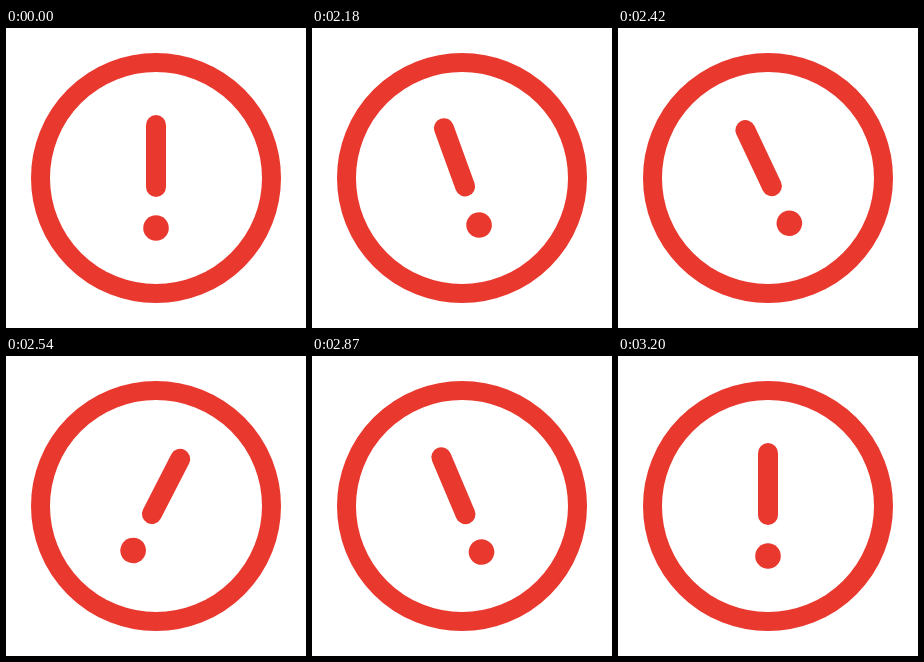
Write an HTML page that moves like this. It is 300 px wide and 300 px high and loops after 3.23 s.

```html
<!DOCTYPE html>
<html lang="en">
<head>
<meta charset="utf-8">
<title>Warning icon</title>
<style>
  html, body { margin: 0; width: 100%; height: 100%; overflow: hidden; background: #fff; }
  svg { display: block; width: 100%; height: 100%; }
</style>
</head>
<body>
<svg viewBox="0 0 300 300">
  <circle cx="150" cy="150" r="115.5" fill="none" stroke="#e9392f" stroke-width="19"/>
  <g id="mark" fill="#e9392f">
    <rect x="140" y="87" width="20" height="82" rx="10"/>
    <circle cx="150" cy="200" r="12.8"/>
  </g>
</svg>
<script>
  const LOOP = 3230, STEP = 30, REST = 2000;
  const mark = document.getElementById('mark');

  // Turning points of the shake: [ms, degrees]
  const swings = [
    [2019, 0], [2147, -30], [2270, 30], [2397, -30], [2524, 30],
    [2639, -30], [2765, 30], [2900, -30], [3025, 27], [3150, 0]
  ];

  const ease = x => (1 - Math.cos(Math.PI * x)) / 2;

  function angleAt(t) {
    const i = swings.findIndex(([time]) => time > t);
    if (i < 1) return 0;
    const [t0, a0] = swings[i - 1];
    const [t1, a1] = swings[i];
    return a0 + (a1 - a0) * ease((t - t0) / (t1 - t0));
  }

  function render(t) {
    // The shake advances in even steps
    const stepped = REST + Math.floor((t - REST) / STEP) * STEP;
    mark.setAttribute('transform', `rotate(${angleAt(stepped).toFixed(2)} 150 150)`);
  }

  const start = performance.now();
  function tick() {
    render((performance.now() - start) % LOOP);
    requestAnimationFrame(tick);
  }
  tick();
</script>
</body>
</html>
```
